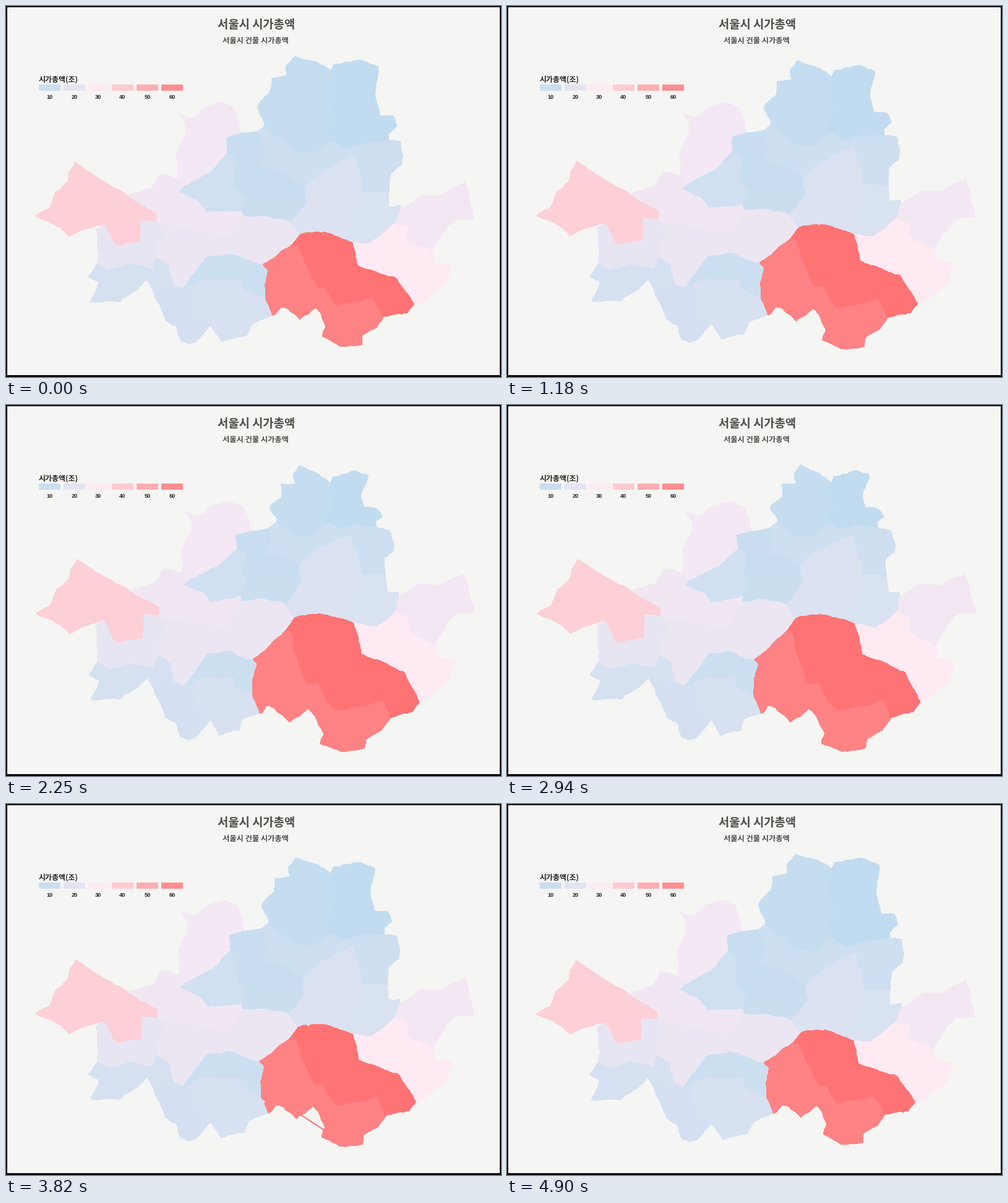
A matplotlib script that plays this animation: 800x600 px, repeating every 5 s.

```python
import numpy as np
import matplotlib.pyplot as plt
from matplotlib.animation import FuncAnimation
from matplotlib.collections import LineCollection, PolyCollection
from matplotlib.patches import Rectangle

W, H, DPI = 800, 600, 100
FRAMES, INTERVAL = 125, 40
STEP, LAST = 97.5, 50        # the map moves in 50 steps of about 98 ms
ROUNDS = 2                   # cartogram iterations
HANGUL = "Noto Sans CJK JP"

areas, values = [], []


def ramp(value):
    """Blue to pink to red."""
    stops = ((193, 220, 240), (253, 234, 243), (255, 115, 116))
    return [np.interp(value, (7, 30, 69), c) / 255 for c in zip(*stops)]


def coast(a, b):
    """Roughened line from a to b, the same for both neighbours."""
    rng = np.random.default_rng([int(c) for p in sorted((a, b)) for c in p])
    line = np.array(sorted((a, b)), float)
    while np.hypot(*(line[1] - line[0])) > 6:
        mid, step = (line[:-1] + line[1:]) / 2, np.diff(line, axis=0)
        reach = np.minimum(.08 * np.hypot(*step.T), 1.2)
        mid += rng.uniform(-1, 1, mid.shape) * reach[:, None]
        line = np.insert(line, np.arange(1, len(line)), mid, axis=0)
    return line[:-1] if a <= b else line[:0:-1]


def district(value, *xy):
    corners = list(zip(xy[::2], xy[1::2]))
    sides = zip(corners, corners[1:] + corners[:1])
    areas.append(np.vstack([coast(a, b) for a, b in sides]))
    values.append(value)


# West
district(38.7, 112, 253, 146, 277, 197, 307, 244, 335, 244, 348, 218, 348,
         218, 382, 178, 388, 158, 354, 125, 361, 102, 372, 88, 358, 48, 340,
         70, 328, 80, 302, 100, 285, 102, 270)
district(21.6, 158, 354, 178, 388, 218, 382, 218, 348, 244, 348, 258, 372,
         243, 385, 243, 405, 237, 426, 200, 417, 165, 428, 148, 418, 151, 400,
         146, 361)
district(14.7, 148, 418, 165, 428, 200, 417, 237, 426, 243, 405, 265, 420,
         272, 450, 285, 458, 236, 456, 228, 441, 212, 458, 188, 472, 184, 478,
         137, 478, 146, 460, 150, 445, 134, 438)
district(14.3, 236, 456, 285, 458, 300, 452, 303, 495, 330, 516, 306, 543,
         295, 546, 283, 541, 275, 517, 258, 508, 245, 478)
district(23.5, 244, 348, 310, 362, 355, 371, 372, 362, 365, 401, 327, 406,
         285, 458, 272, 450, 265, 420, 243, 405, 243, 385, 258, 372)
district(11.2, 285, 458, 327, 406, 365, 401, 416, 418, 424, 428, 419, 450,
         420, 474, 386, 462, 382, 444, 355, 445, 320, 444, 300, 452)
district(15.8, 300, 452, 320, 444, 355, 445, 382, 444, 386, 462, 420, 474,
         431, 500, 397, 515, 388, 533, 349, 542, 330, 516, 303, 495)
district(25, 197, 307, 236, 296, 250, 272, 278, 279, 288, 292, 281, 300,
         310, 314, 325, 332, 382, 330, 384, 340, 372, 362, 355, 371, 310, 362,
         244, 348, 244, 335)
district(26.2, 280, 175, 300, 182, 324, 163, 350, 156, 369, 165, 379, 206,
         357, 214, 358, 238, 326, 272, 288, 292, 278, 279, 275, 240, 290, 208,
         290, 190)
district(12.8, 281, 300, 288, 292, 326, 272, 358, 238, 373, 247, 371, 290,
         389, 312, 382, 330, 325, 332, 310, 314)
# Centre and north
district(9.7, 357, 214, 379, 206, 407, 203, 421, 237, 411, 257, 450, 268,
         484, 293, 484, 307, 389, 312, 371, 290, 373, 247, 358, 238)
district(10.5, 389, 312, 484, 307, 488, 318, 460, 350, 425, 342, 384, 340,
         382, 330)
district(23.5, 384, 340, 425, 342, 460, 350, 476, 370, 463, 386, 416, 418,
         365, 401, 372, 362)
district(12, 407, 203, 418, 194, 470, 235, 498, 238, 525, 216, 548, 230,
         562, 228, 562, 241, 515, 266, 484, 293, 450, 268, 411, 257, 421, 237)
district(8.9, 455, 112, 430, 117, 427, 140, 407, 162, 418, 194, 470, 235,
         498, 238, 525, 216, 480, 181, 463, 165, 470, 125)
district(8.2, 453, 97, 467, 82, 490, 88, 514, 97, 525, 106, 522, 150,
         531, 176, 518, 203, 525, 216, 480, 181, 463, 165, 470, 125, 455, 112)
district(7, 525, 106, 530, 95, 574, 88, 601, 99, 597, 150, 604, 178,
         625, 178, 631, 194, 618, 207, 618, 218, 562, 228, 548, 230, 525, 216,
         518, 203, 531, 176, 522, 150)
district(11.6, 562, 228, 618, 218, 637, 219, 641, 243, 638, 257, 622, 270,
         618, 302, 578, 303, 562, 241)
district(16.6, 484, 293, 515, 266, 562, 241, 578, 303, 565, 324, 525, 308,
         484, 307)
district(17.4, 484, 307, 525, 308, 565, 324, 547, 378, 515, 366, 485, 367,
         476, 370, 460, 350, 488, 318)
district(16.2, 578, 303, 618, 302, 618, 325, 637, 323, 636, 332, 630, 351,
         590, 384, 560, 384, 547, 378, 565, 324)
# South-east
district(30, 560, 384, 590, 384, 630, 351, 653, 357, 648, 377, 689, 395,
         690, 415, 719, 420, 710, 450, 690, 463, 668, 480, 659, 482, 628, 439,
         567, 420)
district(25.8, 630, 351, 636, 332, 672, 307, 705, 306, 742, 284, 755, 344,
         725, 345, 709, 360, 689, 395, 648, 377, 653, 357)
district(64, 416, 418, 463, 386, 474, 388, 485, 418, 505, 455, 517, 454,
         534, 483, 592, 471, 610, 502, 598, 520, 575, 533, 575, 547, 540, 550,
         512, 534, 517, 518, 508, 495, 500, 487, 475, 506, 456, 489, 444, 487,
         431, 500, 420, 474, 419, 450, 424, 428)
district(69, 463, 386, 476, 370, 485, 367, 515, 366, 547, 378, 560, 384,
         567, 420, 628, 439, 659, 482, 648, 496, 610, 502, 592, 471, 534, 483,
         517, 454, 505, 455, 485, 418, 474, 388)


def measure(poly):
    """Size and centroid of a polygon."""
    nxt = np.roll(poly, -1, axis=0)
    cross = poly[:, 0] * nxt[:, 1] - nxt[:, 0] * poly[:, 1]
    total = cross.sum()
    return abs(total) / 2, ((poly + nxt) * cross[:, None]).sum(0) / 3 / total


def inflate(polys):
    """One round of a rubber-sheet cartogram: sizes drift towards values."""
    sizes, centers = zip(*map(measure, polys))
    sizes = np.array(sizes)
    goal = np.array(values) / sum(values) * sizes.sum()
    radius = np.sqrt(sizes / np.pi)
    mass = np.sqrt(goal / np.pi) - radius
    damping = 1 / (1 + np.mean(np.maximum(sizes / goal, goal / sizes)))
    moved = []
    for poly in polys:
        away = poly[:, None] - np.array(centers)
        dist = np.maximum(np.hypot(away[..., 0], away[..., 1]), 1e-6)
        q = dist / radius
        force = mass * np.where(q > 1, 1 / q, q ** 2 * (4 - 3 * q))
        push = (force / dist)[..., None] * away
        moved.append(poly + damping * push.sum(1))
    return moved


def ease(t):
    return 4 * t ** 3 if t < .5 else 1 - 4 * (1 - t) ** 3


swollen = areas
for _ in range(ROUNDS):
    swollen = inflate(swollen)

fig = plt.figure(figsize=(W / DPI, H / DPI), dpi=DPI, facecolor="#f5f5f3")
ax = fig.add_axes([0, 0, 1, 1])
ax.set_xlim(0, W)
ax.set_ylim(H, 0)
ax.axis("off")


def box(x, y, w, h, color):
    ax.add_patch(Rectangle((x, y), w, h, fc=color, lw=0, antialiased=False))


def label(x, y, text, px, color, ha="center", family=HANGUL):
    ax.text(x, y, text, fontsize=px * 72 / DPI, color=color, ha=ha,
            va="baseline", family=family, weight="bold")


tints = [ramp(v) for v in values]
shapes = PolyCollection(areas, facecolors=tints, edgecolors=tints,
                        linewidths=.6, antialiaseds=False)
strays = LineCollection([], linewidths=.72, antialiaseds=False)
ax.add_collection(shapes, autolim=False)
ax.add_collection(strays, autolim=False)

for edge in ((0, 0, W, 2), (0, 0, 2, H), (W - 2, 0, 2, H), (0, H - 3, W, 3)):
    box(*edge, "black")

label(404, 35.5, "서울시 시가총액", 18.8, "#4e4d47")
label(403.5, 60.3, "서울시 건물 시가총액", 12.3, "#4e4d47")
label(53, 122.3, "시가총액(조)", 12, "#22211d", ha="left")
for i in range(6):
    tick = 10 * (i + 1)
    x = 53 + round(39.5 * i)
    box(x, 127, 35, 10, ramp(tick))
    label(x + 17.3, 150.2, str(tick), 9.2, "#22211d",
          family="Liberation Sans")


def draw(frame):
    pose = min(int((frame + .5) * INTERVAL / STEP), LAST)
    p = ease(1 - abs(2 * pose / LAST - 1))
    polys = [a + p * (b - a) for a, b in zip(areas, swollen)]
    shapes.set_verts(polys)

    # Mid-morph, some outlines throw a thin chord in their own colour.
    rng = np.random.default_rng(pose)
    picks = rng.choice(len(polys), 10, replace=False) if .1 < p < .6 else []
    chords = []
    for k in picks:
        n = len(polys[k])
        i = rng.integers(n)
        j = (i + rng.integers(n // 8, n // 3)) % n
        chords.append(polys[k][[i, j]])
    strays.set_segments(chords)
    strays.set_color([tints[k] for k in picks])
    return shapes, strays


anim = FuncAnimation(fig, draw, frames=FRAMES, interval=INTERVAL,
                     repeat=True, repeat_delay=0, blit=False)
plt.show()
```
